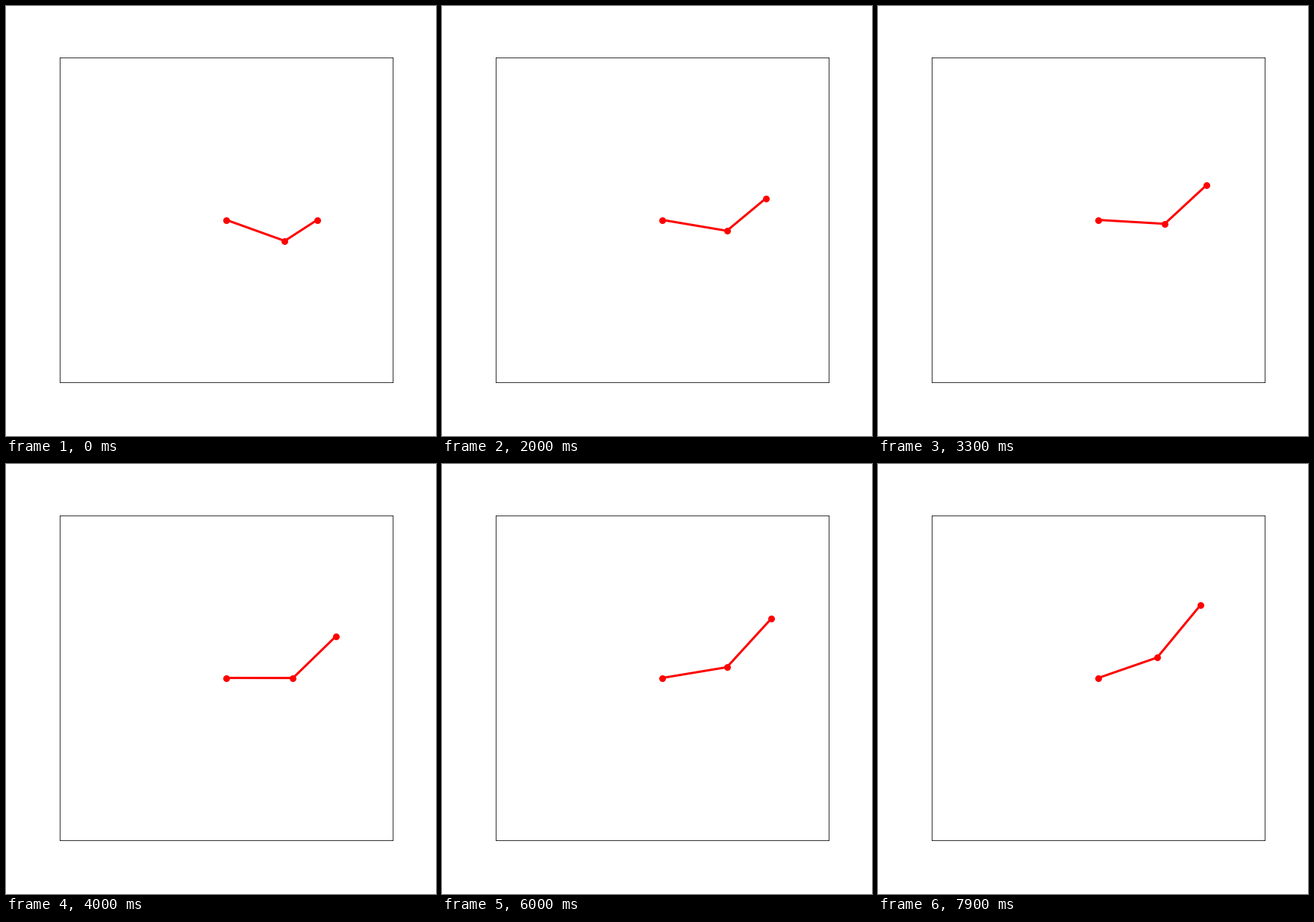
A matplotlib script for the animation above (8 s loop, 576 by 576 pixels).

```python
import numpy as np
import matplotlib.pyplot as plt
from matplotlib.animation import FuncAnimation
from matplotlib.patches import Circle

SIZE, DPI = 576, 72
FRAMES, INTERVAL = 80, 100
STEP = 2 * np.pi / 500  # angle per frame
LEFT, RIGHT, TOP, BOTTOM = 72, 518.4, 69.12, 504
CX, CY = (LEFT + RIGHT) / 2, (TOP + BOTTOM) / 2

fig = plt.figure(figsize=(SIZE / DPI, SIZE / DPI), dpi=DPI, facecolor="white")
ax = fig.add_axes([LEFT / SIZE, 1 - BOTTOM / SIZE,
                   (RIGHT - LEFT) / SIZE, (BOTTOM - TOP) / SIZE])
# Data units are stage pixels, y pointing down.
ax.set_xlim(LEFT, RIGHT)
ax.set_ylim(BOTTOM, TOP)
ax.set_xticks([])
ax.set_yticks([])
for spine in ax.spines.values():
    spine.set_linewidth(0.8)

line, = ax.plot([], [], color="red", lw=3, zorder=2)
dots = [ax.add_patch(Circle((CX, CY), 4.5, fc="red", ec="none", zorder=3))
        for _ in range(3)]


def joints(a):
    """Base, elbow and tip; the last two travel on ellipses."""
    x = CX + np.array([0, 89.2 * np.cos(a - 0.503), 147.57 * np.cos(a - 0.602)])
    y = CY - np.array([0, 58.14 * np.sin(a - 0.5045), 116 * np.sin(a)])
    return x, y


def snap(v):
    """Centre of the pixel that a dot sits on."""
    return np.floor(v + 0.5) + 0.5


def draw(i):
    x, y = joints(i * STEP)
    line.set_data(x, y)
    for dot, px, py in zip(dots, snap(x), snap(y)):
        dot.center = px, py
    return [line, *dots]


anim = FuncAnimation(fig, draw, frames=FRAMES, interval=INTERVAL,
                     repeat=True, repeat_delay=0)
plt.show()
```
